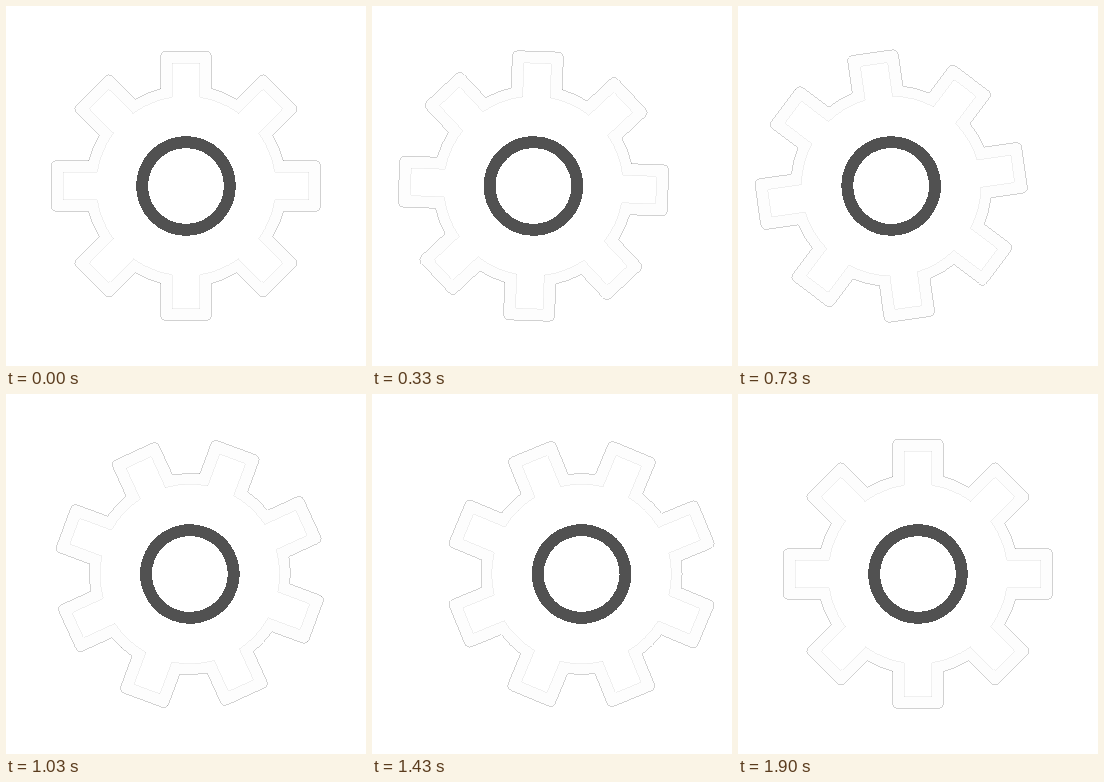
Write an HTML page that moves like this. It is 360 px wide and 360 px high and loops after 2000 ms.

```html
<!DOCTYPE html>
<html>
<head>
<meta charset="utf-8">
<style>
  html, body { margin: 0; width: 100%; height: 100%; overflow: hidden; background: #fff; }
  svg { display: block; width: 100vw; height: 100vh; }
</style>
</head>
<body>
<svg viewBox="0 0 360 360" fill="none" shape-rendering="crispEdges">
  <g id="wheel">
    <path id="band" fill="#fdfdfd" fill-rule="evenodd"/>
    <path id="rim" stroke="#000" stroke-opacity=".55" stroke-width=".32"/>
    <path id="inset" stroke="#000" stroke-opacity=".2" stroke-width=".3"/>
    <circle r="43.8" stroke="#515151" stroke-width="11.8"/>
  </g>
</svg>
<script>
const $ = id => document.getElementById(id);

// Gear outline: tooth tip radius, tooth half width, body radius, corner radius
function gear(tip, half, body, corner) {
  const root = Math.sqrt(body * body - half * half);
  let d = '';
  for (let k = 0; k < 8; k++) {
    const c = Math.cos(k * Math.PI / 4), s = Math.sin(k * Math.PI / 4);
    const at = (x, y) => `${(x * c + y * s).toFixed(2)} ${(x * s - y * c).toFixed(2)} `;
    d += (k ? `A${body} ${body} 0 0 1 ` : 'M') + at(-half, root)
      + 'L' + at(-half, tip - corner)
      + 'Q' + at(-half, tip) + at(corner - half, tip)
      + 'L' + at(half - corner, tip)
      + 'Q' + at(half, tip) + at(half, tip - corner)
      + 'L' + at(half, root);
  }
  return d + `A${body} ${body} 0 0 1 ${-half} ${-root.toFixed(2)}Z`;
}

const outer = gear(134.6, 25.5, 100.5, 6);
const inner = gear(122.8, 13.8, 89.8, 1);
$('rim').setAttribute('d', outer);
$('inset').setAttribute('d', inner);
$('band').setAttribute('d', outer + inner);

// Swing left, right and back to rest; times are in 1/30 s
const LEFT = 19, RIGHT = 42, END = 57;
const ease = p => p * p * (3 - 2 * p + .5 * (1 - p) ** 2);

// kick is the extra speed at the start
function swing(n, kick) {
  if (n < LEFT) {
    const p = n / LEFT;
    return -ease(p) - kick * p * (1 - p) ** 2;
  }
  if (n < RIGHT) return 2 * ease((n - LEFT) / (RIGHT - LEFT)) - 1;
  return 1 - ease(Math.min(1, (n - RIGHT) / (END - RIGHT)));
}

const start = performance.now();
function draw() {
  const t = (performance.now() - start) % 2000;
  const n = Math.floor(t * .03 + .15);
  const x = 180 + 30 * swing(n, .4);
  const turn = 160 * swing(n, -.17);
  $('wheel').setAttribute('transform', `translate(${x} 180) rotate(${turn})`);
  requestAnimationFrame(draw);
}
draw();
</script>
</body>
</html>
```
